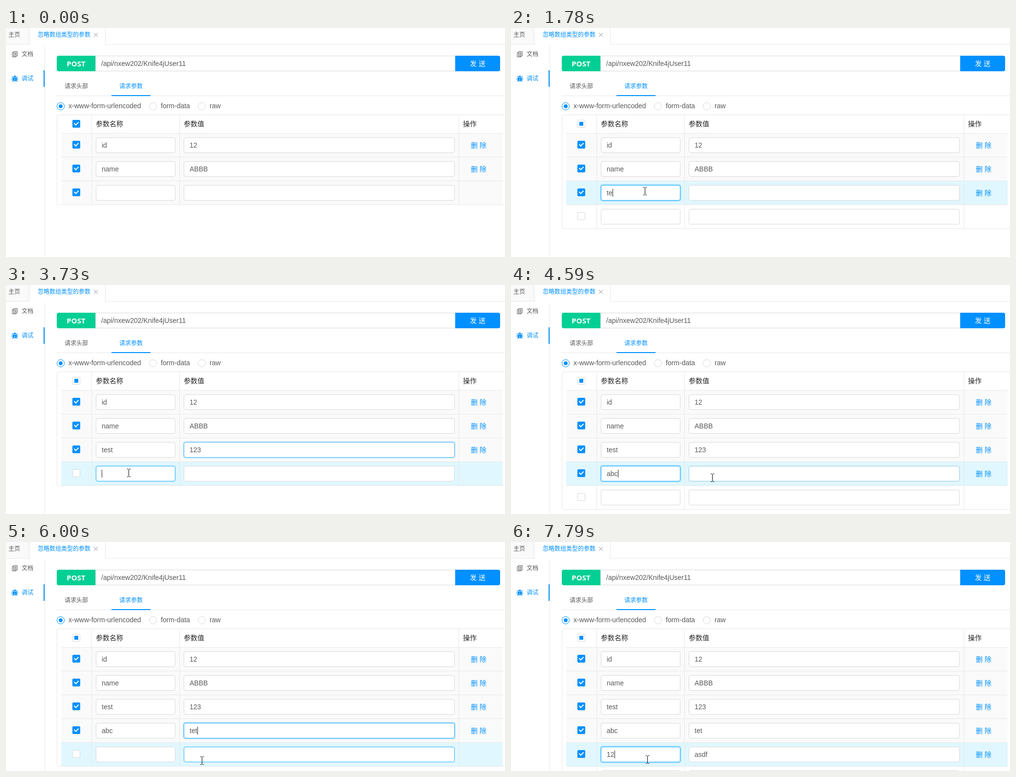
Recreate the animation shown at these times as an HTML page. Size 1022 by 471 pixels, loop 8 s.

```html
<!DOCTYPE html>
<html lang="zh-CN">
<head>
<meta charset="utf-8">
<title>请求参数</title>
<style>
  html, body { margin: 0; width: 100%; height: 100%; overflow: hidden; background: #fff; }
  #stage { position: relative; width: 1022px; height: 471px; overflow: hidden;
    font: 14px/20px "Liberation Sans", Arial, "Noto Sans CJK SC", "Noto Sans CJK", sans-serif; color: #595959; }
  #stage div, #stage svg { position: absolute; box-sizing: border-box; }
  .text { white-space: pre; }
  .small { font-size: 12px; }
  .dark { color: #262626; }
  .blue { color: #0090ff; }
  .line { background: #e8e8e8; }
  .fill { background: #0090ff; }
  .button { color: #fff; text-align: center; line-height: 32px; white-space: pre; }
  .post { background: #02cf94; font: bold 15px/32px "Noto Sans", sans-serif; }
  .radio { width: 16px; height: 16px; border: 1px solid #d9d9d9; border-radius: 50%; }
  .radio.on { border-color: #0090ff; background: radial-gradient(circle, #0090ff 3.6px, transparent 4.4px); }
  .table { border: 1px solid #e8e8e8; border-radius: 4px; }
  .row { left: 0; width: 1022px; height: 49px; }
  .back { left: 113px; width: 904px; height: 49px; border-bottom: 1px solid #e8e8e8; }
  .input { height: 32px; border: 1px solid #d9d9d9; border-radius: 4px; background: #fff;
    padding-left: 11px; display: flex; align-items: center; white-space: pre; }
  .input i { width: 1px; height: 16px; background: #222; }
  .check { left: 136px; width: 16px; height: 16px; border: 1px solid #d9d9d9; border-radius: 2px; background: #fff; }
  .check::after { content: ""; position: absolute; box-sizing: border-box; }
  .check.on { background: #0090ff; border-color: #0090ff; }
  .check.on::after { left: 4px; top: 1px; width: 6px; height: 9px; border: solid #fff; border-width: 0 2px 2px 0; transform: rotate(45deg); }
  .check.some::after { left: 3px; top: 3px; width: 8px; height: 8px; background: #0090ff; }
</style>
</head>
<body>
<div id="stage"></div>
<script>
const stage = document.getElementById('stage');

function add(parent, cls, x, y, w, h, text = '') {
  const el = document.createElement('div');
  el.className = cls;
  el.textContent = text;
  if (x != null) el.style.left = x + 'px';
  if (y != null) el.style.top = y + 'px';
  if (w != null) el.style.width = w + 'px';
  if (h != null) el.style.height = h + 'px';
  parent.append(el);
  return el;
}
const box = (cls, x, y, w, h, text) => add(stage, cls, x, y, w, h, text);
const label = (text, x, midY, cls = '', parent = stage) =>
  add(parent, 'text ' + cls, x, midY - 10, null, null, text);

function svg(x, y, w, h, inner) {
  stage.insertAdjacentHTML('beforeend',
    `<svg style="left:${x}px;top:${y}px" width="${w}" height="${h}" fill="none">${inner}</svg>`);
  return stage.lastElementChild;
}

// Page tabs
box('', 0, 0, 46, 33).style.background = '#fafafa';
box('line', 0, 33, 49, 1);
box('line', 203, 33, 819, 1);
for (const x of [45, 48, 203]) box('line', x, 0, 1, 34);
label('主页', 5, 14, 'small');
label('忽略数组类型的参数', 65, 14, 'small blue');
svg(179, 9, 10, 10, '<path d="M1 1L9 9M9 1L1 9" stroke="#8c9aa8"/>');

// Side menu
box('line', 79, 37, 1, 434);
box('fill', 77, 87, 2, 34);
svg(12, 48, 12, 12, '<path d="M3.5.5H11V9.500H3.500ZM3.500 2.500H1V11.500H8.500V9.500M5 3H9.500M5 5H9.500M5 7H9.500" stroke="#595959"/>');
svg(11, 97, 14, 14, '<path d="M1 3L4 5.500M13 3L10 5.500M0 8H14M1.500 13L4 10.500M12.500 13L10 10.500" stroke="#0090ff" stroke-width="1.3"/>' +
  '<path d="M4 4a3 3 0 0 1 6 0ZM3 5H11V9a4 4 0 0 1-8 0Z" fill="#0090ff"/><path d="M7 7V13" stroke="#fff"/>');
label('文档', 32, 54, 'small');
label('调试', 32, 104, 'small blue');

// Request line
const url = box('input', 183, 57, 738, 32, '/api/nxew202/Knife4jUser11');
url.style.borderRadius = 0;
box('button post', 104, 57, 79, 32, 'POST').style.borderRadius = '4px 0 0 4px';
box('button fill', 920, 57, 92, 32, '发 送').style.borderRadius = '0 4px 4px 0';

// Section tabs and body types
label('请求头部', 120, 120, 'small');
label('请求参数', 232, 120, 'small blue');
box('line', 104, 139, 918, 1);
box('fill', 216, 138, 80, 2);
[['x-www-form-urlencoded', 104], ['form-data', 293], ['raw', 393]].forEach(([text, x], i) => {
  box(i ? 'radio' : 'radio on', x, 153);
  label(text, x + 24, 160);
});

// Parameter table
const table = box('table', 104, 178, 940, 186);
box('line', 113, 216, 904, 1);
label('参数名称', 184, 197, 'dark');
label('参数值', 364, 197, 'dark');
label('操作', 936, 197, 'dark');
const checkAll = box('check on', null, 189);

const rows = Array.from({ length: 6 }, (_, i) => {
  const el = box('row', 0, 217 + 49 * i);
  const back = add(el, 'back');
  const check = add(el, 'check', null, 15);
  const inputs = [[184, 163], [364, 555]].map(([x, w]) => {
    const input = add(el, 'input', x, 8, w);
    const text = document.createElement('span'), caret = document.createElement('i');
    input.append(text, caret);
    return { input, text, caret };
  });
  return { el, back, check, inputs, del: label('删 除', 952, 24, 'blue', el) };
});
const rules = [175, 355, 927].map(x => box('line', x, 179, 1, 184));

const beam = svg(0, 0, 9, 17, '<path d="M1 .5H3.500M5.500.5H8M4.500 1V16M1 16.500H3.500M5.500 16.500H8" stroke="#000"/>');
const arrow = svg(0, 0, 13, 20, '<path d="M.5.8V16.500L4.200 13L6.800 18.800L9 17.800L6.500 12H11.700Z" fill="#fff" stroke="#000"/>');

// lit: border highlight, focus: glow and caret, keys: times of each typed letter
const END = 1e5;
const fields = [
  { row: 0, col: 0, text: 'id' },
  { row: 0, col: 1, text: '12' },
  { row: 1, col: 0, text: 'name' },
  { row: 1, col: 1, text: 'ABBB' },
  { row: 2, col: 0, text: 'test', keys: [1690, 1770, 1860, 1960], lit: [[600, 2420]], focus: [1000, 2420] },
  { row: 2, col: 1, text: '123', keys: [2790, 2790, 3120], lit: [[350, 550], [2200, 3640]], focus: [2420, 3640] },
  { row: 3, col: 0, text: 'abc', keys: [4050, 4140, 4240], lit: [[3480, 4810]], focus: [3640, 4810] },
  { row: 3, col: 1, text: 'tet', keys: [5290, 5390, 5620], lit: [[4470, 6030]], focus: [4810, 6030] },
  { row: 4, col: 0, text: '12', keys: [7520, 7620], lit: [[7080, END]], focus: [7250, END] },
  { row: 4, col: 1, text: 'asdf', keys: [6540, 6620, 6700, 6790], lit: [[5760, 7250]], focus: [6030, 7250] },
];
const hovers = { 2: [320, 3320], 3: [3320, 5740], 4: [5740, END] };
const filledAt = [0, 0, 1690, 4050, 6540, END];
const path = [
  [210, 450, 468], [430, 410, 343], [860, 274, 335], [2060, 274, 335], [2400, 394, 342],
  [3150, 394, 342], [3620, 251, 386], [4280, 251, 386], [4590, 412, 396],
  [5640, 412, 396], [5960, 401, 449], [6860, 401, 449], [7200, 279, 447],
];

const smooth = k => { k = Math.min(1, Math.max(0, k)); return k * k * (3 - 2 * k); };
const fade = (t, [a, b]) => smooth((t - a) / 300) - smooth((t - b) / 300);
const mix = (a, b, k) => `rgb(${a.map((v, i) => Math.round(v + (b[i] - v) * k))})`;

function drawField(f, t) {
  const { input, text, caret } = rows[f.row].inputs[f.col];
  const typed = f.keys ? f.keys.filter(k => k <= t) : null;
  text.textContent = typed ? f.text.slice(0, typed.length) : f.text;
  const lit = (f.lit || []).reduce((sum, span) => sum + fade(t, span), 0);
  input.style.borderColor = mix([217, 217, 217], [20, 174, 255], Math.min(1, lit));
  const glow = f.focus ? fade(t, f.focus) : 0;
  input.style.boxShadow = `0 0 0 2px rgba(0,144,255,${0.2 * glow})`;
  const focused = f.focus && t >= f.focus[0] && t < f.focus[1];
  const since = focused ? t - Math.max(f.focus[0], ...typed) : 0;
  caret.style.visibility = focused && since % 1060 < 530 ? 'visible' : 'hidden';
}

function drawRow(row, i, t) {
  const filled = i < 3 || t >= filledAt[i];
  row.el.style.display = i < 3 || t >= filledAt[i - 1] ? '' : 'none';
  row.check.className = filled ? 'check on' : 'check';
  row.del.style.display = t >= filledAt[i] ? '' : 'none';
  const base = filled ? [250, 250, 250] : [255, 255, 255];
  row.back.style.background = mix(base, [224, 247, 255], hovers[i] ? fade(t, hovers[i]) : 0);
}

function drawPointer(t) {
  let i = path.findIndex(p => p[0] > t);
  if (i < 0) i = path.length;
  const a = path[Math.max(0, i - 1)], b = path[Math.min(i, path.length - 1)];
  const k = b[0] > a[0] ? smooth((t - a[0]) / (b[0] - a[0])) : 0;
  const x = Math.round(a[1] + (b[1] - a[1]) * k), y = Math.round(a[2] + (b[2] - a[2]) * k);
  const inColumn = (x >= 184 && x < 347) || (x >= 364 && x < 919);
  const inRow = y < 217 + 49 * rowCount(t) && (y - 217) % 49 >= 8 && (y - 217) % 49 < 40;
  const over = inColumn && inRow, shown = t >= path[0][0];
  beam.style.display = shown && over ? '' : 'none';
  arrow.style.display = shown && !over ? '' : 'none';
  beam.style.transform = `translate(${x - 4}px, ${y - 8}px)`;
  arrow.style.transform = `translate(${x}px, ${y}px)`;
}

const rowCount = t => 1 + filledAt.filter(at => at <= t).length;

function draw(t) {
  const height = 49 * rowCount(t);
  table.style.height = 39 + height + 'px';
  for (const rule of rules) rule.style.height = 37 + height + 'px';
  checkAll.className = t < filledAt[2] ? 'check on' : 'check some';
  rows.forEach((row, i) => drawRow(row, i, t));
  fields.forEach(f => drawField(f, t));
  drawPointer(t);
}

const start = performance.now();
function tick() {
  draw((performance.now() - start) % 8000);
  requestAnimationFrame(tick);
}
draw(0);
requestAnimationFrame(tick);
</script>
</body>
</html>
```
